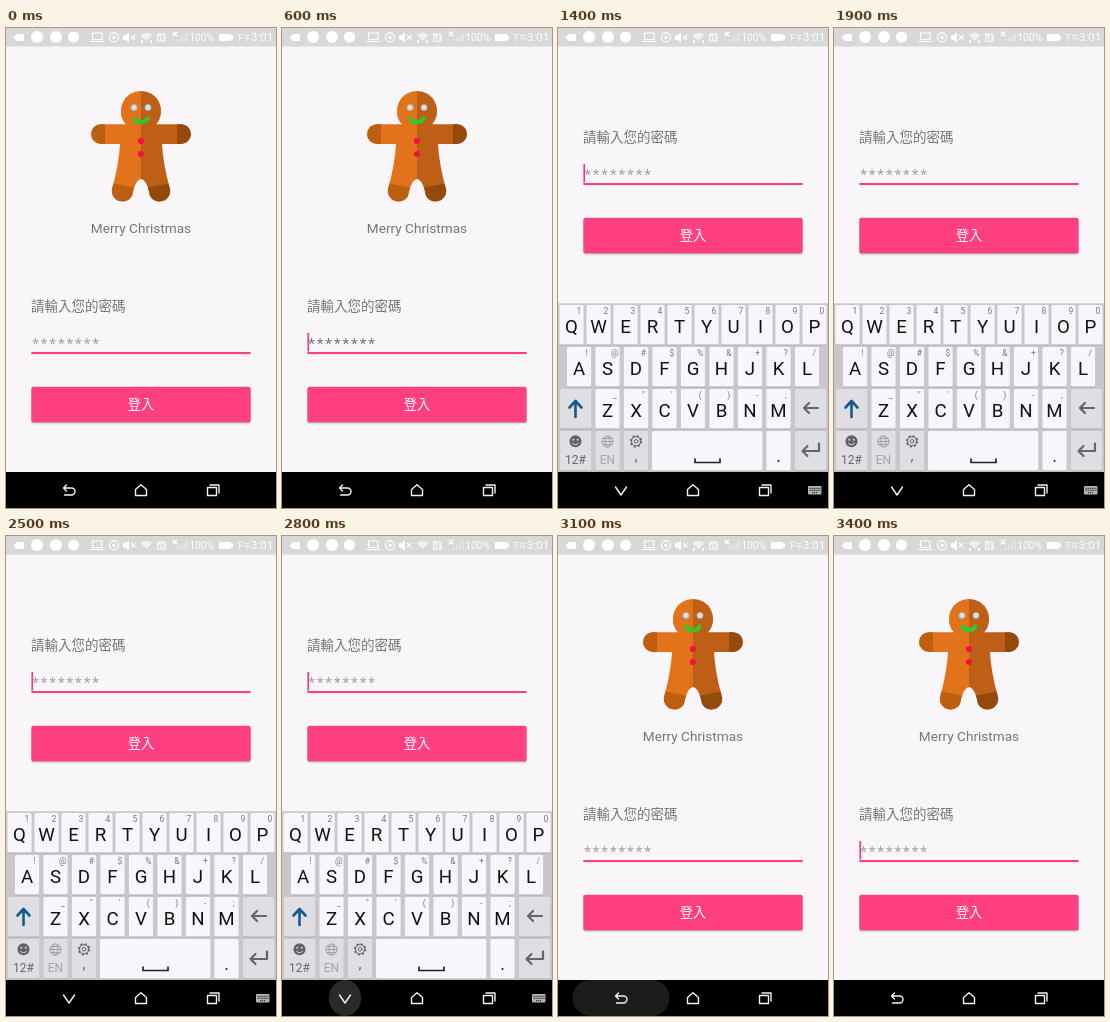
These frames come from a looping animation (270x480 px, 3.6 s). An HTML page:

```html
<!DOCTYPE html>
<html lang="zh-Hant">
<head>
<meta charset="utf-8">
<title>Login</title>
<style>
  html, body { margin: 0; width: 100%; height: 100%; overflow: hidden; background: #f8f6f9; }
  svg { display: block; width: 100vw; height: 100vh; }
  text { font-family: Roboto, sans-serif; text-anchor: middle; }
  .cjk { font-family: "Noto Sans CJK TC", "Noto Sans CJK JP", "Noto Sans CJK", sans-serif; }
  .mono { font-family: "Noto Sans Mono", monospace; text-anchor: start; }
  .left { text-anchor: start; }
  .letter { font-size: 18.7px; font-stretch: 82%; fill: #111113; }
  .line { fill: none; stroke-linecap: round; stroke-linejoin: round; }
</style>
</head>
<body>
<svg viewBox="0 0 270 480">
  <defs>
    <path id="half" d="M135 63A20 20 0 0 0 119.8 96.2H95A9.9 9.9 0 0 0 95 116H114Q113 136 105.8 162A10.8 10.8 0 0 0 126 168Q129 152 135 151Z"/>
    <clipPath id="body"><use href="#half"/></clipPath>
    <g id="caps" clip-path="url(#body)">
      <path d="M84 95H99V117H84ZM100 154L130 160V178H100Z"/>
    </g>
  </defs>
  <rect width="270" height="480" fill="#f8f6f9"/>

  <g id="cookie">
    <use href="#half" fill="#e2731b"/>
    <use href="#caps" fill="#bd5f10"/>
    <g transform="matrix(-1 0 0 1 270 0)">
      <use href="#half" fill="#bf5f16"/>
      <use href="#caps" fill="#944a0d"/>
    </g>
    <g fill="#cfe3ec" stroke="#a9b9bd" stroke-width=".8">
      <circle cx="128" cy="79.5" r="3"/><circle cx="142" cy="79.5" r="3"/>
    </g>
    <path class="line" d="M128.6 90.5Q130 94.6 134.8 93.8Q140 94.6 141.4 90.5" stroke="#2fc92f" stroke-width="4"/>
    <g fill="#f5113c"><circle cx="135" cy="113" r="3.1"/><circle cx="135" cy="126" r="3.1"/></g>
    <text x="135" y="205" font-size="13.6" fill="#757575">Merry Christmas</text>
  </g>

  <g id="form">
    <text class="cjk left" x="25" y="283" font-size="13.5" fill="#757575">請輸入您的密碼</text>
    <text id="hint" class="mono" x="25.2" y="320.7" font-size="14.3">********</text>
    <rect x="25.4" y="324" width="219.2" height="2.1" fill="#f8407f"/>
    <rect id="caret" x="25.4" y="305" width="1.7" height="18.5" fill="#f03c7c"/>
    <rect x="25" y="360" width="220" height="36.6" rx="2.5" fill="#000" opacity=".07"/>
    <rect x="25.4" y="359.5" width="219.2" height="35.8" rx="2" fill="#000" opacity=".2"/>
    <rect x="25.4" y="358.7" width="219.2" height="35.6" rx="2" fill="#ff3f80"/>
    <text class="cjk" x="135" y="381.2" font-size="13.3" fill="#fff">登入</text>
  </g>

  <g id="status">
    <rect width="270" height="18.5" fill="#d9d8d9"/>
    <g fill="#fff">
      <path d="M7.5 9.5L11 6H18V13H11Z"/>
      <circle cx="31" cy="9" r="6"/><circle cx="50" cy="9" r="6"/><circle cx="67.5" cy="9" r="5.6"/>
      <path d="M117 7.3H119.5L123 4.5V14.5L119.5 11.7H117Z"/>
      <path d="M134.5 7Q140.5 2.5 146.5 7L140.5 13Z" opacity=".65"/>
      <path d="M151 5H158L160 7V14H151Z" opacity=".65"/>
      <path d="M171 14H173V11H171ZM174 14H176V9H174ZM177 14H179V7H177ZM180 14H182V5H180Z" opacity=".35"/>
      <path d="M213 6H225V7.6H227V11.4H225V13H213Z"/>
    </g>
    <path id="net" d="M136 12V15M145 12V15" stroke="#fff" stroke-width="1.6"/>
    <g class="line" stroke="#fff" stroke-width="1.2">
      <path d="M86.5 5H96V11.5H86.5ZM84.5 13.5H98"/>
      <circle cx="108" cy="9.3" r="4.5"/><circle cx="108" cy="9.3" r="1.3"/>
      <path d="M125.5 7.5L129 11M129 7.5L125.5 11M167 4L171 8M171 4L167 8"/>
      <path d="M153.5 12V9M156.5 12V7.5" stroke="#d0d0d0"/>
    </g>
    <g fill="#fff">
      <text x="195.7" y="13" font-size="10.4">100%</text>
      <text class="cjk" x="237.5" y="12.8" font-size="7.5">下午</text>
      <text x="256" y="13.3" font-size="11.8">3:01</text>
    </g>
  </g>

  <g id="board">
    <rect y="275.3" width="270" height="168.7" fill="#c9c7cc"/>
    <g id="keys"></g>
    <path d="M17.5 373V389M11.5 379.5L17.5 373L23.5 379.5" class="line" stroke="#16598f" stroke-width="2.6"/>
    <g class="line" stroke="#66666a" stroke-width="2.2">
      <path d="M246 380H260M251 375L246 380L251 385"/>
      <path d="M261 415.5V423H244.5M249.5 418L244.5 423L249.5 428"/>
    </g>
    <circle cx="17.5" cy="413.3" r="6" fill="#626266"/>
    <g fill="#dedde1"><circle cx="15.3" cy="411.8" r="1"/><circle cx="19.7" cy="411.8" r="1"/></g>
    <path class="line" d="M14.5 415.2Q17.5 418.5 20.5 415.2" stroke="#dedde1"/>
    <g class="line" stroke="#a0a0a4" stroke-width="1">
      <circle cx="49.5" cy="413.5" r="5.5"/><ellipse cx="49.5" cy="413.5" rx="2.5" ry="5.5"/>
      <path d="M44 413.5H55M45 410.5H54M45 416.5H54"/>
    </g>
    <g class="line" stroke="#66666a">
      <circle cx="78" cy="413.3" r="5.4" stroke-width="1.6" stroke-dasharray="2.1 2.14" style="stroke-linecap:butt"/>
      <circle cx="78" cy="413.3" r="4.5" stroke-width="1.1"/><circle cx="78" cy="413.3" r="1.8"/>
    </g>
    <path d="M137 430.5V434.5H162V430.5" fill="none" stroke="#222" stroke-width="1.7"/>
    <g font-size="12" fill="#66666a">
      <text x="17.5" y="435.7">12#</text>
      <text x="49.5" y="435.7" fill="#a6a6aa">EN</text>
      <text x="78" y="432.5" font-size="15">,</text>
      <text x="220.5" y="434" font-size="18" fill="#222">.</text>
    </g>
  </g>

  <g id="nav">
    <rect y="444" width="270" height="36" fill="#000"/>
    <rect id="ripple" y="444" height="36" rx="18" fill="#2a2a2a"/>
    <g class="line" stroke="#f2f2f2" stroke-width="1.4">
      <path id="back" d="M60.5 457L57.5 460L60.5 463M57.5 460H65.5A3.5 3.5 0 0 1 65.500 467H58.500"/>
      <path id="down" d="M57.5 459L63 467L68.5 459"/>
      <path d="M129.500 461.5L135 456.8L140.5 461.5V467.5H129.5Z"/>
      <path d="M201.5 459.5H210.5V467.5H201.5ZM204 457H213V465"/>
    </g>
    <g id="ime">
      <rect x="250" y="458" width="13.5" height="8.5" rx="1" fill="#b4b4b4"/>
      <path d="M251.5 460.3H262.5M251.5 462.3H262.5M254 464.7H260" stroke="#000" stroke-width=".9" stroke-dasharray="1.2 .8"/>
    </g>
  </g>
</svg>
<script>
const $ = id => document.getElementById(id);
const LOOP = 3600, STEP = 100, LIFT = -169;
const LIGHT = '#f8f6fa', GRAY = '#dfdee2';

const esc = c => c.replace('&', '&amp;');
const cap = (x, y, w, fill) =>
  `<rect x="${x}" y="${y + 1}" width="${w}" height="39.5" rx="1.5" fill="#adabb0"/>` +
  `<rect x="${x}" y="${y}" width="${w}" height="39.5" rx="1.5" fill="${fill}"/>`;

function row(letters, hints, x0, pitch, y) {
  return [...letters].map((c, i) => {
    const x = x0 + i * pitch;
    return cap(x - 12.2, y, 24.4, LIGHT) +
      `<text class="letter" x="${x}" y="${y + 27.7}">${c}</text>` +
      `<text x="${x + 7.3}" y="${y + 8.8}" font-size="8.5" fill="#77777b">${esc(hints[i])}</text>`;
  }).join('');
}

$('keys').innerHTML =
  row('QWERTYUIOP', '1234567890', 13.5, 27, 277) +
  row('ASDFGHJKL', '!@#$%&+?/', 21, 28.5, 319) +
  row('ZXCVBNM', '_"\'()-;', 49.5, 28.5, 361) +
  cap(2, 361, 31.5, GRAY) + cap(237, 361, 31, GRAY) +
  cap(2, 403, 31.5, GRAY) + cap(37.3, 403, 24.4, GRAY) +
  cap(65.8, 403, 24.4, GRAY) + cap(94, 403, 110.5, LIGHT) +
  cap(208.3, 403, 24.4, LIGHT) + cap(237, 403, 31, GRAY);

const show = (id, on) => $(id).setAttribute('visibility', on ? 'visible' : 'hidden');
const between = (t, a, b) => t >= a && t < b;
const clamp = v => Math.min(1, Math.max(0, v));

function draw(ms) {
  const t = Math.floor(ms % LOOP / STEP) * STEP;
  const typing = between(t, 700, 3100);
  const closable = between(t, 700, 3000);

  show('cookie', !typing);
  show('board', typing);
  $('form').setAttribute('transform', `translate(0 ${typing ? LIFT : 0})`);
  show('caret', between(t % 1000, 400, 900));
  $('hint').setAttribute('fill', between(t, 500, 700) ? '#6c6c6e' : '#9c9b9e');

  show('down', closable);
  show('ime', closable);
  show('back', !closable);
  show('net', !between(t, 2100, 3100));

  // back key ripple: spreads, then fades
  const w = 97 * clamp((t - 2700) / 300);
  $('ripple').setAttribute('x', 63 - w / 2);
  $('ripple').setAttribute('width', w);
  $('ripple').setAttribute('opacity', clamp((3300 - t) / 300));
}

const start = performance.now();
function tick() {
  draw(performance.now() - start);
  requestAnimationFrame(tick);
}
draw(0);
requestAnimationFrame(tick);
</script>
</body>
</html>
```
